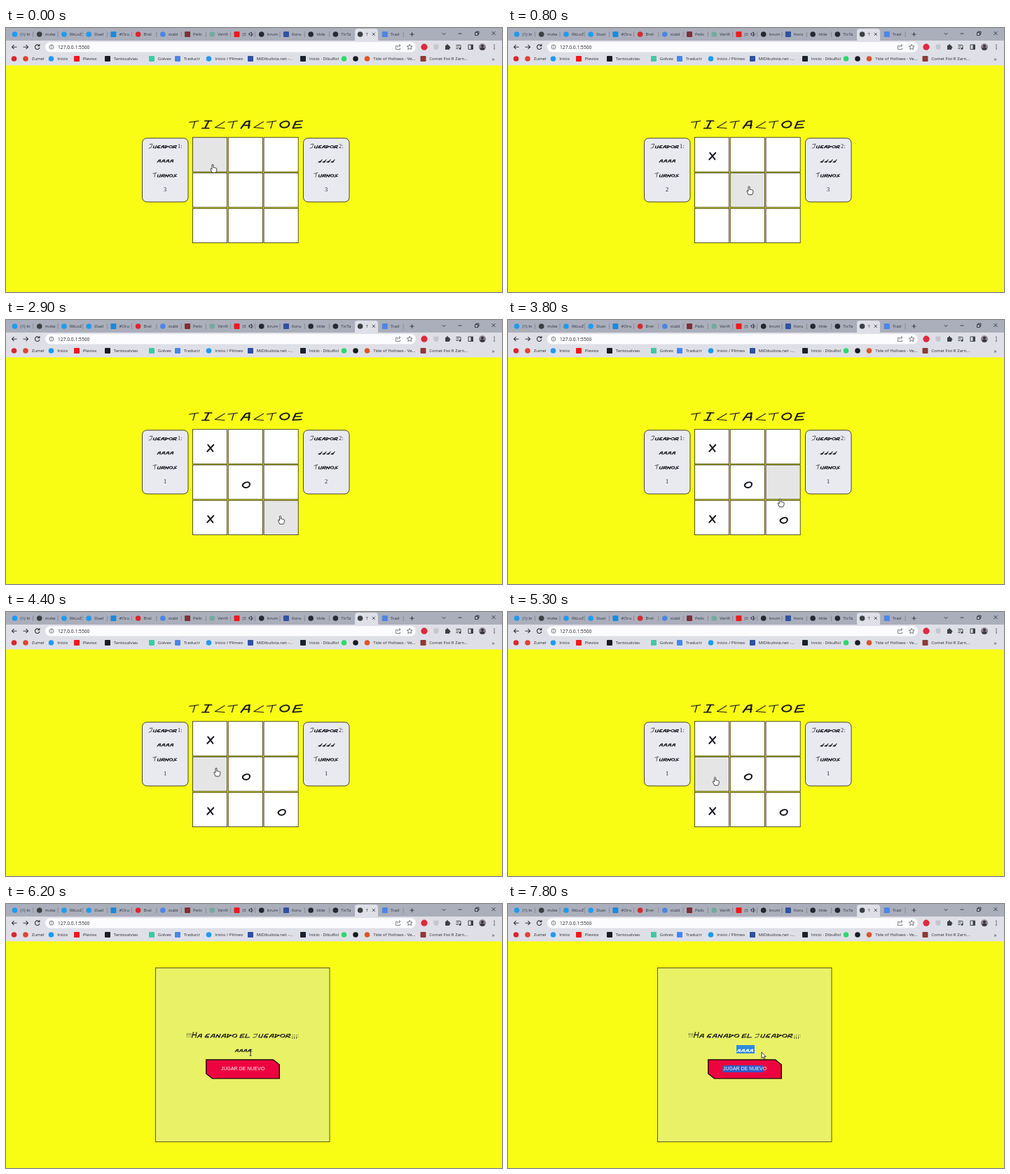
An HTML page with a canvas for the animation above (8000 ms loop, 708 by 378 pixels).

```html
<!DOCTYPE html>
<html lang="es">
<head>
<meta charset="utf-8">
<title>Tic Tac Toe</title>
<style>
html, body { margin: 0; width: 708px; height: 378px; overflow: hidden; }
canvas { display: block; }
</style>
</head>
<body>
<canvas id="stage" width="708" height="378"></canvas>
<script>
const canvas = document.getElementById('stage');
const ctx = canvas.getContext('2d');
const LOOP = 8000, STEP = 100, WIN_AT = 5500;
const INK = '#20222a', YELLOW = '#f9fd14', STRIP = '#abaebb', TOOLBAR = '#dfe0e7';
const UI = '"Open Sans", sans-serif';
const SERIF = '"Liberation Serif", serif';
const SANS = '"Liberation Sans", sans-serif';

// Slanted display lettering, each letter on a 10 x 10 grid.
const glyphs = {
  T: 'M0 2L10 0M6 1L4 10',
  I: 'M3 0h7M7 0L3 10M0 10h7',
  C: 'M10 1L0 9L10 10',
  A: 'M0 10L5 1L9 0L8 10M3 6h6',
  O: 'M4 1C12-2 11 8 6 9S-3 5 4 1Z',
  E: 'M10 0L3 1L0 10L9 9M2 5h6',
  J: 'M2 1L10 0L6 9L0 10',
  U: 'M3 1L1 9L7 10L10 0',
  G: 'M10 0L4 1L0 9L7 10V6h-4',
  D: 'M3 0L0 10L10 3L1 1',
  R: 'M0 10L3 1L10 0L9 5L2 6L9 10',
  N: 'M0 10L3 1L7 10L10 0',
  S: 'M10 0L3 2L8 7L0 10',
  H: 'M3 0L0 10M10 0L8 10M1 5h8',
  L: 'M3 0L0 10L9 9',
  X: 'M1 0L9 10M10 0L0 10',
  d: 'M10 0L5 10L0 9L7 5'
};
for (const key in glyphs) glyphs[key] = new Path2D(glyphs[key]);
const thinLetters = 'TCJ';

function rect(x, y, w, h, fill) {
  ctx.fillStyle = fill;
  ctx.fillRect(x, y, w, h);
}
function pill(x, y, w, h, r, fill, stroke) {
  ctx.beginPath();
  ctx.roundRect(x, y, w, h, r);
  ctx.fillStyle = fill;
  ctx.fill();
  if (stroke) line(null, stroke, 0.9);
}
function frameBox(x, y, w, h, fill, stroke, width) {
  rect(x, y, w, h, fill);
  ctx.strokeStyle = stroke;
  ctx.lineWidth = width;
  ctx.strokeRect(x, y, w, h);
}
function dot(x, y, r, fill) {
  ctx.beginPath();
  ctx.arc(x, y, r, 0, 7);
  ctx.fillStyle = fill;
  ctx.fill();
}
function line(path, color = '#45474d', width = 1) {
  ctx.strokeStyle = color;
  ctx.lineWidth = width;
  path ? ctx.stroke(new Path2D(path)) : ctx.stroke();
}
function text(str, x, y, size, family, color = INK, align = 'left') {
  ctx.font = `${size}px ${family}`;
  ctx.fillStyle = color;
  ctx.textAlign = align;
  ctx.fillText(str, x, y);
}
function glyph(ch, x, y, w, h, weight, color = '#15161c') {
  ctx.save();
  ctx.translate(x, y);
  ctx.scale(w / 10, h / 10);
  ctx.lineJoin = ctx.lineCap = 'round';
  ctx.strokeStyle = color;
  ctx.lineWidth = weight * (thinLetters.includes(ch) ? 0.65 : 1.1) * 20 / (w + h);
  ctx.stroke(glyphs[ch]);
  ctx.restore();
}
// Letters stand on the baseline; the first may be taller.
function word(str, x, base, { w, h, step, first = h, weight = 1, color }) {
  [...str].forEach((ch, i) => {
    const tall = i ? h : first;
    glyph(ch, x + i * step, base - tall, w, tall, weight, color);
  });
}

const tabs = [
  ['#1d9bf0', '(1) In'], ['#3c4043', 'mzke'], ['#1d9bf0', 'RkLoZ'], ['#1d9bf0', 'Duel'],
  ['#1e88d8', '#Oru'], ['#d9272e', 'Brel'], ['#4a86e8', 'stabl'], ['#7c3038', 'Pelíc'],
  ['#74aa9c', 'Verifi'], ['#f01818', '(5'], ['#24292f', 'brum'], ['#2e51a2', 'Koru'],
  ['#24292f', 'tilde'], ['#24292f', 'TicTa'], ['#3c4043', 'T'], ['#4a86e8', 'Trad']
];
const squareTabs = [4, 7, 9, 11, 15];

const bookmarks = [
  [11.5, '#d9272e', ''], [28, '#dc4437', 'Zumel'], [64.5, '#1d9bf0', 'Inicio'],
  [101, '#f01818', 'Pleviox', 1], [145, '#1b1c20', 'Tantosalvias', 1], [208, '#43c7a4', 'Golvex', 1],
  [245, '#4a86e8', 'Traducir', 1], [289.5, '#1d9bf0', 'Inicio / Plimeo'],
  [349, '#2e51a2', 'MiDibulista.net -...', 1], [424, '#19212d', 'Inicio · DibuRol', 1],
  [482.5, '#2bd96b', ''], [499, '#1b1c20', ''], [515.5, '#d8572a', 'Tide of Hollows - Ve...'],
  [595.5, '#8c3a35', 'Comet Fist R Zarn...', 1]
];

function icon(x, y, color, square) {
  if (square) pill(x - 4, y - 4, 8, 8, 1, color);
  else dot(x, y, 3.8, color);
}

function drawBrowser() {
  rect(0, 0, 708, 18, STRIP);
  rect(0, 18, 708, 35.5, TOOLBAR);
  pill(498, 1, 33, 18, [4, 4, 0, 0], TOOLBAR);
  tabs.forEach(([color, label], i) => {
    const x = 12.5 + 35.22 * i;
    icon(x, 9, color, squareTabs.includes(i));
    text(label, x + 8, 11.3, 6.1, UI, '#33353c');
    if (i < 13 || i === 15) rect(x + 26, 5, 0.6, 8, '#74777f');
  });
  line('M347 7.5h1.5l2-1.7v6l-2-1.7h-1.5zM352 7.5v3', INK, 0.8);
  line('M522.8 6.8l4 4m0-4l-4 4M576.5 9h6M579.5 6v6', INK, 0.8);
  line('M622.5 7l2.5 2.5 2.5-2.5M645.5 8h5M669.5 6.5h4v4h-4zM671 6.5v-1.5h4v4h-1.5M693.5 5l5 5m0-5l-5 5', INK, 0.8);

  line('M15.5 27.2h-7m3-3l-3 3 3 3', '#33353a', 1.1);
  line('M24.5 27.2h7m-3-3l3 3-3 3', '#33353a', 1.1);
  line('M47.3 25.2a3.3 3.3 0 1 0 .6 2.8M47.9 23v2.7h-2.7', '#33353a', 1.1);
  pill(56, 20, 529, 14.5, 7.25, '#fcfcfe');
  ctx.beginPath();
  ctx.arc(65, 27.2, 3, 0, 7);
  line(null, '#55585e', 0.8);
  line('M65 26.6v2M65 25.2v.8', '#55585e', 0.8);
  text('127.0.0.1:5500', 74, 29.7, 6.7, UI, '#202124');
  line('M559 25.5h-2.5v5h6v-2M558.5 28q.5-3 4-3m-1.5-2l2 2-2 2', '#66696f', 0.8);
  line('M576.2 23.3l1.1 2.6 2.8.2-2.1 1.8.7 2.8-2.5-1.5-2.4 1.5.6-2.8-2.1-1.8 2.8-.2z', '#55585e', 0.8);
  dot(597, 27.2, 4.6, '#e0283f');
  pill(610.5, 23.5, 7, 7.5, [1, 1, 4, 4], '#c4c6cc');
  rect(627, 25, 6, 6, '#3c4043');
  dot(630, 24.7, 1.4, '#3c4043');
  dot(633, 28, 1.4, '#3c4043');
  line('M642.5 24.5h6M642.5 27h4M642.5 29.5h3M649 24.5v5', '#3c4043', 1);
  dot(648, 29.6, 1.5, '#3c4043');
  line('M660 24h6.5v6.5h-6.5z', '#3c4043', 1);
  rect(663.5, 24, 3, 6.5, '#3c4043');
  dot(680, 27.2, 5, '#8c8190');
  dot(680, 25.8, 2, '#383440');
  pill(676.7, 28, 6.6, 3.4, [3, 3, 2, 2], '#383440');
  for (const y of [24.5, 27.2, 29.9]) dot(697, y, 0.8, '#33353a');

  for (const [x, color, label, square] of bookmarks) {
    icon(x, 44, color, square);
    text(label, x + 8.7, 46.2, 6.1, UI, '#26282e');
  }
  text('»', 693.5, 46.5, 8, UI, '#303238');
}

const small = { w: 5, h: 3.7, step: 5.7, first: 6 };

function drawPanel(x, number, name, turns) {
  pill(x + 0.5, 157.8, 65.5, 91.2, 6.5, '#e9eaf0', '#2e2f2a');
  word('JUGADOR', x + 10, 172, small);
  text(number + ':', x + 51, 171.5, 8.3, SERIF);
  word(name, x + 22, 192.3, { ...small, first: 3.7, step: 6 });
  word('TURNOS', x + 16, 213.3, small);
  text(':', x + 48.5, 213.3, 8.3, SERIF);
  text(turns, x + 33, 233.5, 8.3, SERIF, INK, 'center');
}

const PITCH = 50.8;
const cellX = i => 266.5 + PITCH * (i % 3);
const cellY = i => 156.7 + PITCH * Math.floor(i / 3);

const moves = [
  { at: 200, cell: 0, mark: 'X' },
  { at: 1300, cell: 4, mark: 'O' },
  { at: 2300, cell: 6, mark: 'X' },
  { at: 3400, cell: 8, mark: 'O' }
];

function drawGame(t, pointer) {
  word('TICTACTOE', 261.5, 143.5, { w: 13.5, h: 10.5, step: 18.5, weight: 1.8 });
  const played = moves.filter(m => t >= m.at);
  const left = mark => 3 - played.filter(m => m.mark === mark).length;
  drawPanel(194, 1, 'AAAA', left('X'));
  drawPanel(424, 2, 'dddd', left('O'));
  for (let i = 0; i < 9; i++) {
    const dx = pointer.x - 1 - cellX(i), dy = pointer.y - 5 - cellY(i);
    const hover = dx >= 0 && dx < PITCH && dy >= 0 && dy < PITCH;
    frameBox(cellX(i), cellY(i), 49.1, 49.3, hover ? '#e5e5e5' : '#fff', '#32330f', 0.85);
  }
  for (const { cell, mark } of played) {
    const x = cellX(cell) + 25.3, y = cellY(cell) + 27;
    if (mark === 'X') glyph('X', x - 4.5, y - 5, 9, 9.5, 1.8);
    else glyph('O', x - 5, y - 2.8, 10.5, 9, 1.8);
  }
}

function drawWinner(t, pointer) {
  frameBox(213.5, 91.5, 248.5, 249, '#e9f266', '#34361c', 0.8);
  text('!!!', 257, 190.5, 8.3, SERIF);
  let x = 265.5;
  for (const part of ['HA', 'GANADO', 'EL', 'JUGADOR']) {
    word(part, x, 191.2, { w: 6.5, h: 5, step: 7.8, first: part === 'HA' ? 7.5 : 5, weight: 1.1 });
    x += part.length * 7.8 + 3;
  }
  text('¡¡¡:', 407.5, 190.5, 8.3, SERIF);

  const selected = t >= 6600;
  if (selected) rect(326, 202, 26, 12, '#2f8bdc');
  word('AAAA', 327, 211.8, { ...small, first: 3.7, step: 6, color: selected ? '#fff' : INK });
  if (!selected) text(':', 350, 212, 8.3, SERIF);

  const button = new Path2D('M285.8 223H381.5L390.3 230V249.9H294.5L285.8 243Z');
  ctx.fillStyle = '#ec0340';
  ctx.fill(button);
  ctx.strokeStyle = '#22060c';
  ctx.lineWidth = 1.4;
  ctx.stroke(button);
  if (t >= 6900) rect(306.5, 231, Math.min(pointer.x, 364) - 306.5, 10, '#2f5cc8');
  text('JUGAR DE NUEVO', 338, 238.4, 7, SANS, '#fff', 'center');
}

// Time, then pointer centre.
const track = [
  [0, 296, 201], [300, 296, 201], [900, 349, 235], [1000, 356, 239], [1300, 355, 239],
  [1700, 312, 262], [2000, 288, 278], [2400, 288, 279], [2900, 392.5, 286], [3500, 392.5, 287],
  [4100, 386, 236], [4400, 301, 229], [4800, 299, 236], [5300, 296.5, 242], [5600, 296.5, 242],
  [6200, 349, 213], [6800, 349, 213], [7200, 366, 218], [7500, 366, 218], [7800, 364, 217], [8000, 364, 217]
];
function pointerAt(t) {
  const i = track.findIndex(key => key[0] > t);
  const [t0, x0, y0] = track[i - 1], [t1, x1, y1] = track[i];
  const k = (t - t0) / (t1 - t0), ease = k * k * (3 - 2 * k);
  return { x: x0 + (x1 - x0) * ease, y: y0 + (y1 - y0) * ease };
}

const hand = new Path2D('M-2-5q1-1.4 2 0v4q1.2-.8 1.8.2 1.1-.6 1.7.4 1.1-.3 1.3 1v2q-.4 2-1.4 3.6h-5.2L-4 1.5q-.3-1.5 1-1.2l1 1z');
const arrow = new Path2D('M-2-5V3.7L0 2l1.3 3 1.5-.7-1.3-2.8H4z');

function drawPointer(t, { x, y }) {
  ctx.save();
  ctx.translate(x, y);
  ctx.lineJoin = 'round';
  const onButton = y > 222;
  if (t >= 6000 && t < 7200 && !onButton) {
    line('M-1.5-4h3M0-4v8M-1.5 4h3', '#202020', 0.9);
  } else {
    const shape = t < WIN_AT || onButton ? hand : arrow;
    ctx.fillStyle = '#fff';
    ctx.fill(shape);
    ctx.strokeStyle = '#151515';
    ctx.lineWidth = 0.8;
    ctx.stroke(shape);
  }
  ctx.restore();
}

function frame(now) {
  const t = Math.floor(now % LOOP / STEP) * STEP;
  const pointer = pointerAt(t);
  rect(0, 0, 708, 378, YELLOW);
  drawBrowser();
  (t < WIN_AT ? drawGame : drawWinner)(t, pointer);
  drawPointer(t, pointer);
  requestAnimationFrame(frame);
}
requestAnimationFrame(frame);
</script>
</body>
</html>
```
